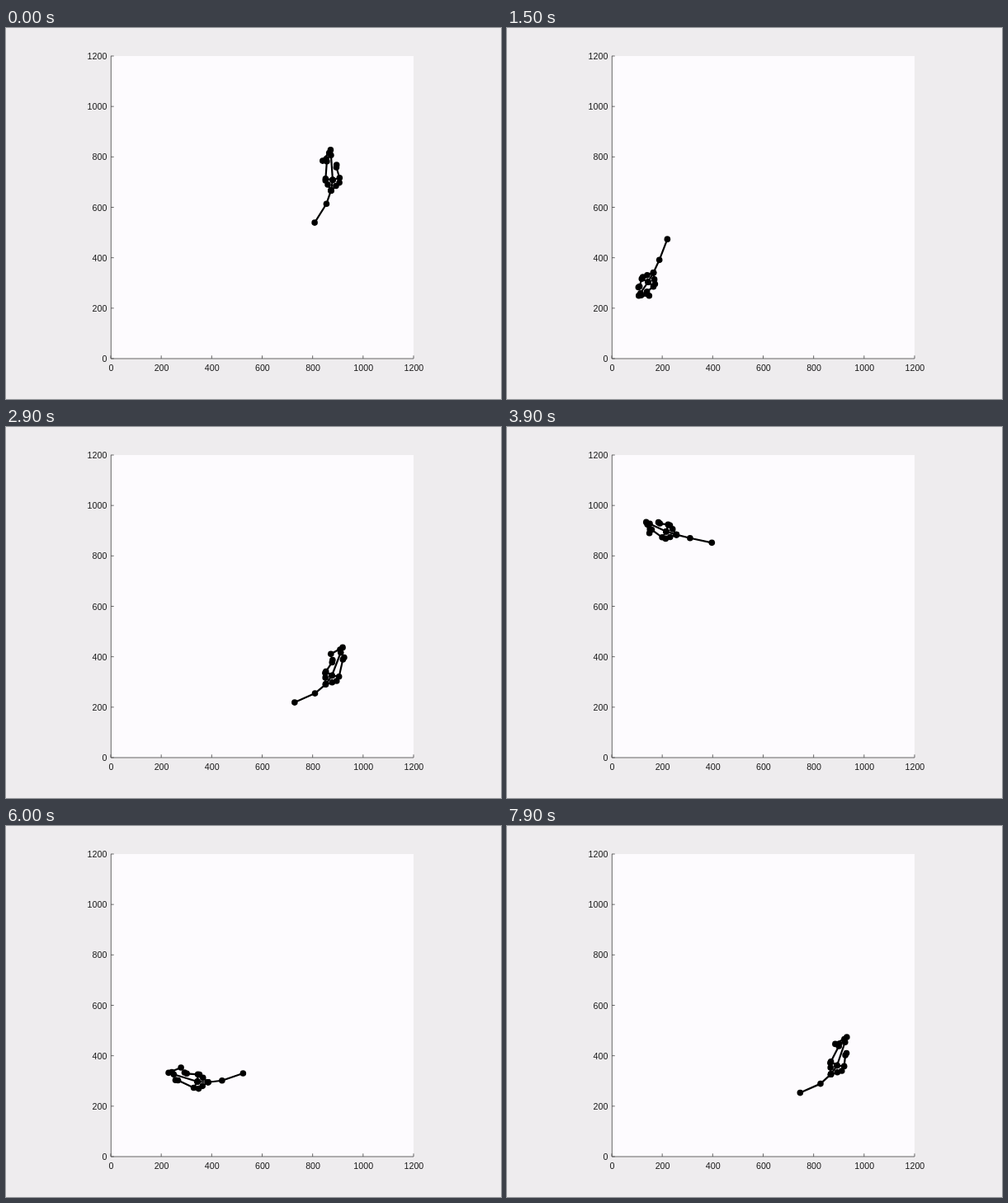
An HTML page with a canvas that plays this animation: 600 px wide and 450 px high, repeating every 8 s.

```html
<!DOCTYPE html>
<html lang="en">
<head>
<meta charset="utf-8">
<title>Walking skeleton</title>
<style>
html, body { margin: 0; width: 100%; height: 100%; overflow: hidden; background: #eeecee; }
canvas { display: block; }
</style>
</head>
<body>
<canvas id="stage" width="600" height="450"></canvas>
<script>
const ctx = document.getElementById('stage').getContext('2d');
const LOOP = 8000, STEP = 100;
const LEFT = 127, BOTTOM = 401, SIZE = 367, MAX = 1200;
const LAG = 3, STRIDE = 19.75;

// Way points of the mid spine: step, x, y, heading in degrees
const PATH = [
  [0, 396, 184.3, -94], [4, 336, 104, -142], [9, 205, 138, -232],
  [12, 178, 228, -249], [15, 171, 308, -236], [18, 200, 304, -305],
  [26, 350, 316, -384], [29, 395, 301.5, -429], [33, 400, 200, -455],
  [36, 352, 122, -528], [39, 193, 126.7, -515], [43, 285, 111, -362],
  [45, 376, 128, -310], [47, 395, 175, -266], [50, 390, 240.5, -273],
  [54, 372, 288, -232], [60, 232, 310, -163], [63, 182, 214, -118],
  [66, 235, 122, 18], [69, 337.5, 129.5, 20], [72, 388, 226, 75],
  [76, 384, 300, -24], [79, 400, 290.5, -71]
];

const clamp = (v, lo, hi) => Math.max(lo, Math.min(hi, v));

function slope(i, k) {
  const a = PATH[i], b = PATH[i + 1];
  return (b[k] - a[k]) / (b[0] - a[0]);
}

// Tangent that never overshoots
function tangent(i, k) {
  if (i === 0) return slope(0, k);
  if (i === PATH.length - 1) return slope(i - 1, k);
  const p = slope(i - 1, k), q = slope(i, k);
  return p * q <= 0 ? 0 : 2 * p * q / (p + q);
}

function track(step, k) {
  if (step < 0) return PATH[0][k] + step * slope(0, k);
  let i = 0;
  while (i < PATH.length - 2 && PATH[i + 1][0] <= step) i++;
  const a = PATH[i], b = PATH[i + 1], d = b[0] - a[0];
  const u = Math.min(1, (step - a[0]) / d), v = 1 - u;
  return v * v * (1 + 2 * u) * a[k] + u * u * (3 - 2 * u) * b[k]
    + d * u * v * (v * tangent(i, k) - u * tangent(i + 1, k));
}

const heading = step => track(step, 3);

// Point ahead of and to the right of p, seen along angle deg
function offset(p, deg, ahead, right) {
  const a = deg * Math.PI / 180, c = Math.cos(a), s = Math.sin(a);
  return [p[0] + c * ahead - s * right, p[1] + s * ahead + c * right];
}

// Chains of joints making up the body
function body(step) {
  const spine = [track(step, 1), track(step, 2)];
  const h = heading(step);
  const rear = heading(step - LAG * 0.36);

  // The tail follows earlier headings
  const hip = offset(spine, rear, -13, 0);
  const mid = offset(hip, heading(step - LAG * 0.64), -17, 0);
  const tip = offset(mid, heading(step - LAG), -27, 0);

  // Rearing at the left wall shortens the front, the head leans into the turn
  const reach = clamp((spine[0] - 105) / 120, 0.5, 1);
  const lean = clamp((h - heading(step - 12)) / 60, -1, 1);
  const front = (ahead, right) => offset(spine, h, ahead * reach, right);
  const swing = 4 * Math.cos(2 * Math.PI * step / STRIDE);

  const chains = [[
    tip, mid, hip, spine,
    front(30, 0), front(33, 2 * lean), front(36.5, 0), front(24, 10.5 * lean)
  ]];
  for (const side of [-1, 1]) {
    const s = -side * swing;
    chains.push(
      [spine, front(2, 8.5 * side), front(19 + s, 5.5 * side), front(22 + s, 6 * side)],
      [hip, offset(hip, rear, 6.5, 5 * side), offset(hip, rear, 11, 8.5 * side)]
    );
  }
  return chains;
}

function drawBody(chains) {
  ctx.strokeStyle = ctx.fillStyle = '#000';
  ctx.lineWidth = 2.2;
  ctx.lineJoin = 'round';
  for (const chain of chains) {
    ctx.beginPath();
    for (const p of chain) ctx.lineTo(...p);
    ctx.stroke();
    for (const [x, y] of chain) {
      ctx.beginPath();
      ctx.arc(x, y, 3.8, 0, Math.PI * 2);
      ctx.fill();
    }
  }
}

function drawAxes() {
  ctx.fillStyle = '#eeecee';
  ctx.fillRect(0, 0, 600, 450);
  ctx.fillStyle = '#fdfbfe';
  ctx.fillRect(LEFT, BOTTOM - SIZE, SIZE, SIZE);
  ctx.strokeStyle = '#555';
  ctx.lineWidth = 0.9;
  ctx.fillStyle = '#1a1a1a';
  ctx.font = '10.7px "Liberation Sans", Arial, sans-serif';
  ctx.beginPath();
  ctx.moveTo(LEFT + 0.3, BOTTOM - SIZE);
  ctx.lineTo(LEFT + 0.3, BOTTOM);
  ctx.lineTo(LEFT + SIZE, BOTTOM);
  for (let v = 0; v <= MAX; v += 200) {
    const d = v / MAX * SIZE;
    ctx.moveTo(LEFT + d, BOTTOM);
    ctx.lineTo(LEFT + d, BOTTOM - 3.7);
    ctx.moveTo(LEFT, BOTTOM - d);
    ctx.lineTo(LEFT + 3.7, BOTTOM - d);
    ctx.textAlign = 'center';
    ctx.fillText(v, LEFT + d + 0.4, 415.8);
    ctx.textAlign = 'right';
    ctx.fillText(v, 122.4, BOTTOM - d + 4);
  }
  ctx.stroke();
}

const start = performance.now();
function draw(now) {
  const t = Math.max(0, now - start) % LOOP;
  drawAxes();
  drawBody(body(Math.floor(t / STEP)));
  requestAnimationFrame(draw);
}
draw(start);
</script>
</body>
</html>
```
